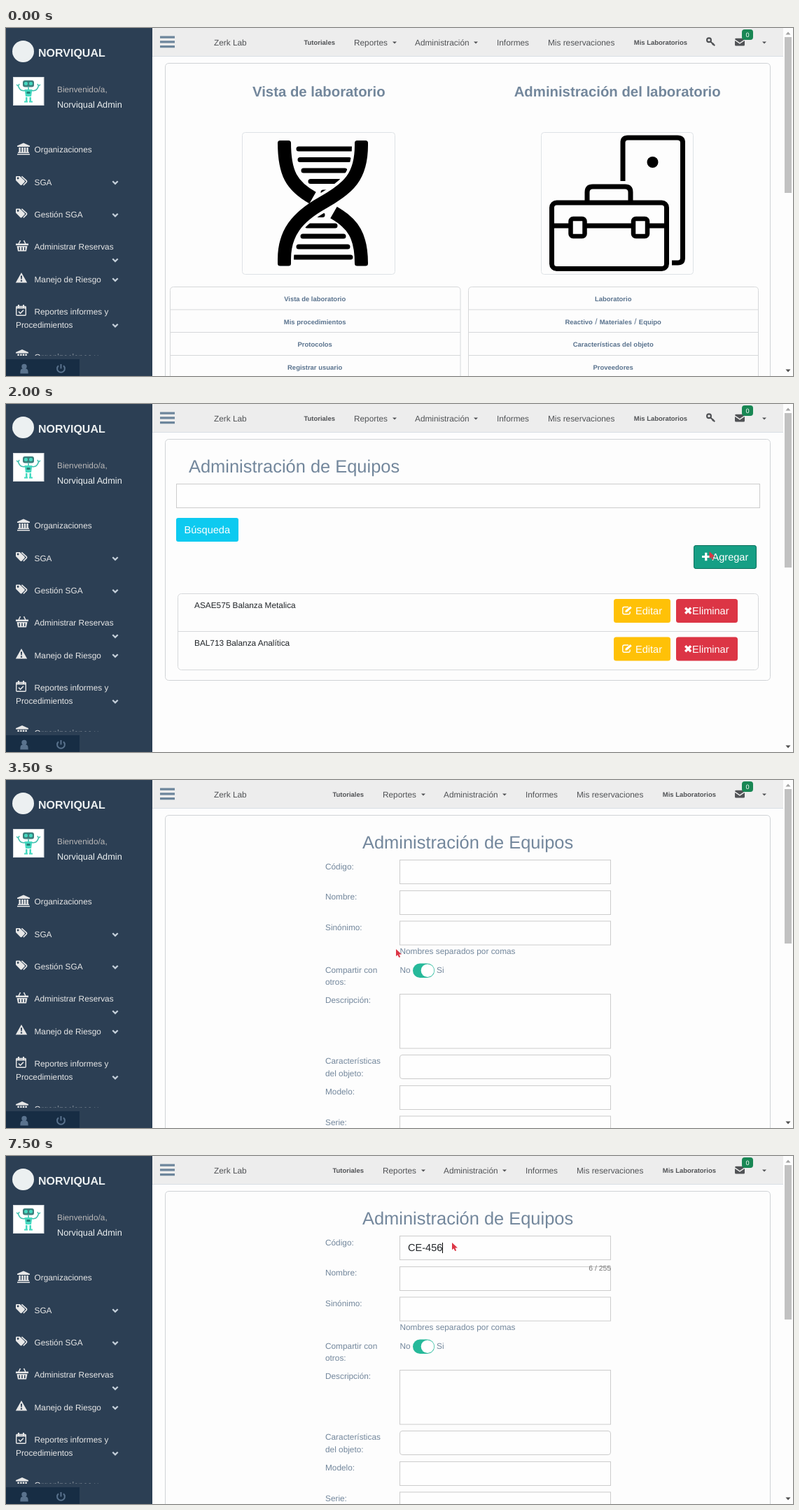
Recreate the animation shown at these times as an HTML page. Size 1124 px wide and 498 px high, loop 8 s.

```html
<!DOCTYPE html>
<html lang="es">
<head>
<meta charset="utf-8">
<title>Administración de Equipos</title>
<style>
html, body { margin: 0; width: 100%; height: 100%; overflow: hidden; background: #fdfdfd; }
svg { display: block; }
text { font: 11.83px "Liberation Sans", Arial, sans-serif; text-rendering: geometricPrecision; white-space: pre; }
.brand { font-size: 16px; font-weight: 700; }
.small, .small text { font-size: 9.46px; font-weight: 700; }
.slash { font-size: 11.83px; font-weight: 400; }
.head { font-size: 20.35px; font-weight: 700; }
.title { font-size: 25.45px; }
.btn text, .typed { font-size: 14.56px; }
.mid, .mid text { text-anchor: middle; }
.slate { fill: #73879c; }
.line { fill: none; stroke: #d6d8da; }
.field { fill: #fefefe; stroke: #ccc; }
.ink { fill: none; stroke: #000; stroke-width: 7; }

.home, .list, .form, .key, .hover, .typed-in, .caret, .nav, .cursor, .thumb {
  animation: 8s step-end infinite;
}
.home { animation-name: home; }
.list { animation-name: list; }
.form { animation-name: form; }
.key { animation-name: key; }
.hover { animation-name: hover; }
.typed-in { animation-name: typed; }
.caret { animation-name: caret; }
.nav { animation-name: nav; }
.cursor { animation-name: cursor; }
.thumb { animation-name: thumb; }
@keyframes home { 0% { opacity: 1 } 12.5%, 100% { opacity: 0 } }
@keyframes list { 0% { opacity: 0 } 12.5% { opacity: 1 } 31.25%, 100% { opacity: 0 } }
@keyframes form { 0% { opacity: 0 } 31.25%, 100% { opacity: 1 } }
@keyframes key { 0% { opacity: 1 } 31.25%, 100% { opacity: 0 } }
@keyframes hover { 0% { opacity: 0 } 25% { opacity: 1 } 31.25%, 100% { opacity: 0 } }
@keyframes typed { 0% { opacity: 0 } 87.5%, 100% { opacity: 1 } }
@keyframes caret { 0% { opacity: 0 } 93.75%, 100% { opacity: 1 } }
@keyframes nav { 0% { transform: none } 31.25%, 100% { transform: translate(41px, 0) } }
@keyframes cursor {
  0% { opacity: 0; transform: translate(911px, 416px) }
  6.25% { opacity: 1; transform: translate(911px, 416px) }
  25% { opacity: 1; transform: translate(1004.5px, 211px) }
  43.75% { opacity: 1; transform: translate(557px, 242px) }
  62.5%, 100% { opacity: 1; transform: translate(637px, 124px) }
}
@keyframes thumb {
  0% { height: 223px } 25% { height: 221px } 31.25% { height: 223px } 43.75%, 100% { height: 221px }
}
</style>
</head>
<body>
<svg width="1124" height="498" viewBox="0 0 1124 498">
<defs>
  <path id="chev" d="M-3.7 -1.8L0 1.9L3.7 -1.8" fill="none" stroke="#c4cfda" stroke-width="2.2"/>
  <path id="drop" d="M0 0h6l-3 3z" fill="#515356"/>
  <path id="bank" d="M9 0L18 4V5.5H0V4zM2.4 6.4h2.4V13H2.4zM6.2 6.4h2.4V13H6.2zM9.8 6.4h2.4V13H9.8zM13.4 6.4h2.4V13h-2.4zM1 13h16v1.6H1zM0 15.4h18V17H0z"/>
  <g id="tags">
    <path fill-rule="evenodd" d="M0 1.2Q0 0 1.2 0H5.8L12.6 6.6Q13.4 7.5 12.6 8.4L8.4 12.7Q7.5 13.4 6.6 12.7L0 6zM1.7 3a1.4 1.4 0 1 0 2.8 0a1.4 1.4 0 1 0 -2.8 0z"/>
    <path d="M8.4 .4L15.3 6.6Q16 7.5 15.3 8.4L10.8 13" fill="none" stroke="#e7e7e7" stroke-width="1.6"/>
  </g>
  <g id="edit" fill="none" stroke="#fff">
    <path d="M9 1.5H3Q.8 1.5 .8 3.7V9.6Q.8 11.8 3 11.8H9Q11.2 11.8 11.2 9.6V8" stroke-width="1.4"/>
    <path d="M5.4 8L12.7 1.6" stroke-width="3.2"/>
    <path d="M4.3 9.2l.5-2.4 1.9 2z" fill="#fff" stroke="none"/>
  </g>
  <g id="row" class="btn">
    <rect x="868" y="279" width="81" height="34" rx="3.5" fill="#ffc107"/>
    <rect x="957" y="279" width="88" height="34" rx="3.5" fill="#dc3545"/>
    <use href="#edit" x="880" y="289"/>
    <path d="M970.2 291.8l8 8M978.2 291.8l-8 8" stroke="#fff" stroke-width="3.4"/>
    <text x="899" y="301" fill="#fff">Editar</text>
    <text x="980" y="301" fill="#fff">Eliminar</text>
  </g>
  <rect id="input" class="field" x="562.5" width="301" height="34"/>
  <rect id="latch" x="-10" y="-13" width="20" height="25" rx="3.5" fill="#fdfdfd" stroke="#000" stroke-width="6.5"/>
  <clipPath id="menu"><rect width="209" height="469"/></clipPath>
</defs>

<rect width="1124" height="498" fill="#fdfdfd"/>

<g class="home">
  <path class="line" d="M227.5 498V56q0-5.500 5.500-5.500H1086q5.500 0 5.500 5.500V498" style="stroke:#d0d3d6"/>
  <g class="mid">
    <text class="head slate" x="446.800" y="98">Vista de laboratorio</text>
    <text class="head slate" x="873.200" y="98">Administración del laboratorio</text>
  </g>
  <rect class="line" x="337.500" y="149.500" width="218" height="203" rx="4" style="stroke:#dee2e6"/>
  <rect class="line" x="764.500" y="149.500" width="217" height="203" rx="4" style="stroke:#dee2e6"/>
  <g class="ink" stroke-linecap="round">
    <path d="M418 173H494M420 188.500H490M425 204H484M435 219.500H478M453 235H470M435 267.500H452M430 283H470M424 298H482M418 313H488M412 328H492"/>
    <g stroke-linecap="butt" stroke-width="19">
      <path d="M507.500 164V168C507.500 212 490 229 452.500 250S397.500 294 397.500 331V337" stroke="#fdfdfd" stroke-width="27"/>
      <path d="M397.500 164C397.500 208 408 226 438 243M468 264C496 280 507.500 298 507.500 337"/>
      <path d="M507.500 164V168C507.500 212 490 229 452.500 250S397.500 294 397.500 331V337"/>
    </g>
    <path d="M391.500 164.500h12M501.500 164.500h12M391.500 337h12M501.500 337h12"/>
  </g>
  <g class="ink">
    <path d="M881 219V164q0-7 7-7H959q7.500 0 7.500 7V329q0 7-7 7H951"/>
    <path d="M830 249V235q0-8 8-8H884q8 0 8 8V249M780 283H943"/>
    <rect x="779.500" y="250" width="164" height="94.500" rx="7"/>
  </g>
  <circle cx="923.500" cy="192" r="8"/>
  <use href="#latch" x="816.500" y="286"/>
  <use href="#latch" x="906" y="286"/>
  <path class="line" d="M234.500 498V375.500q0-5 5-5H644q5 0 5 5V498M234.500 403H649M234.500 435.500H649M234.500 468.500H649"/>
  <path class="line" d="M660.500 498V375.500q0-5 5-5H1069.500q5 0 5 5V498M660.500 403H1074.500M660.500 435.500H1074.500M660.500 468.500H1074.500"/>
  <g class="small mid" fill="#5a738e">
    <text x="441.200" y="390.500">Vista de laboratorio</text>
    <text x="441.200" y="423.500">Mis procedimientos</text>
    <text x="441.200" y="456">Protocolos</text>
    <text x="441.200" y="489">Registrar usuario</text>
    <text x="867.200" y="390.500">Laboratorio</text>
    <text x="867.200" y="423.500">Reactivo<tspan class="slash"> / </tspan>Materiales<tspan class="slash"> / </tspan>Equipo</text>
    <text x="867.200" y="456">Características del objeto</text>
    <text x="867.200" y="489">Proveedores</text>
  </g>
</g>

<g class="list">
  <rect class="line" x="227.500" y="50.500" width="864" height="345" rx="5" style="stroke:#d0d3d6"/>
  <text class="title slate" x="261" y="98">Administración de Equipos</text>
  <rect class="field" x="243.500" y="114.500" width="833" height="34"/>
  <g class="btn" fill="#fff">
    <rect x="243" y="163" width="89" height="34" rx="3" fill="#0dcaf0"/>
    <text x="254.500" y="185">Búsqueda</text>
    <rect x="982.500" y="202.500" width="89" height="33" rx="3" fill="#26b99a" stroke="#169f85"/>
    <rect class="hover" x="982.500" y="202.500" width="89" height="33" rx="3" fill="#169f85" stroke="#0e6f5d"/>
    <path d="M994 218.500h11.500M999.750 212.800v11.500" stroke="#fff" stroke-width="3.200"/>
    <text x="1008.500" y="224">Agregar</text>
  </g>
  <path class="line" d="M245.500 325.500H1074.500"/>
  <rect class="line" x="245.500" y="271.500" width="829" height="109" rx="5"/>
  <text x="269" y="291.500" fill="#212529">ASAE575 Balanza Metalica</text>
  <text x="269" y="346" fill="#212529">BAL713 Balanza Analítica</text>
  <use href="#row"/>
  <use href="#row" y="54.500"/>
</g>

<g class="form">
  <path class="line" d="M227.500 498V56q0-5.500 5.500-5.500H1086q5.500 0 5.500 5.500V498" style="stroke:#d0d3d6"/>
  <text class="title slate" x="509" y="98">Administración de Equipos</text>
  <g class="slate">
    <text x="456" y="127.500">Código:</text>
    <text x="456" y="171">Nombre:</text>
    <text x="456" y="214.500">Sinónimo:</text>
    <text x="562.500" y="249">Nombres separados por comas</text>
    <text x="456" y="275.500">Compartir con</text>
    <text x="456" y="292.500">otros:</text>
    <text x="562.500" y="276">No</text>
    <text x="615" y="276">Si</text>
    <text x="456" y="319">Descripción:</text>
    <text x="456" y="406">Características</text>
    <text x="456" y="423.500">del objeto:</text>
    <text x="456" y="450">Modelo:</text>
    <text x="456" y="493.500">Serie:</text>
  </g>
  <use href="#input" y="114.500"/>
  <use href="#input" y="158.500"/>
  <use href="#input" y="202"/>
  <rect class="field" x="562.500" y="306.500" width="301" height="77.500"/>
  <rect class="field" x="562.500" y="393.500" width="301" height="34" rx="3.500"/>
  <use href="#input" y="437.500"/>
  <use href="#input" y="481"/>
  <rect x="581" y="262.500" width="31" height="20.500" rx="10.250" fill="#26b99a"/>
  <circle cx="602" cy="272.700" r="9.300" fill="#fff"/>
  <g class="typed-in">
    <text class="typed" x="574" y="136" fill="#212529">CE-456</text>
    <text x="864" y="163.500" text-anchor="end" fill="#777" style="font-size:10.400px">6 / 255</text>
  </g>
  <rect class="caret" x="623" y="124" width="1" height="15"/>
</g>

<rect x="209" width="901" height="40" fill="#ededed"/>
<rect x="209" y="40" width="901" height="1" fill="#d9dee4"/>
<path d="M220 13.200h21M220 19.900h21M220 26.600h21" stroke="#6d869c" stroke-width="3.300"/>
<g fill="#515356">
  <text x="297" y="24.500">Zerk Lab</text>
  <g class="nav">
    <text class="small" x="425.500" y="24">Tutoriales</text>
    <text x="497" y="24.500">Reportes</text>
    <use href="#drop" x="552" y="19.500"/>
    <text x="584" y="24.500">Administración</text>
    <use href="#drop" x="668" y="19.500"/>
    <text x="701" y="24.500">Informes</text>
    <text x="774" y="24.500">Mis reservaciones</text>
    <text class="small" x="896.800" y="24">Mis Laboratorios</text>
  </g>
  <g class="key" fill="none" stroke="#515356">
    <circle cx="1004" cy="17.300" r="2.900" stroke-width="2.200"/>
    <path d="M1006 19.300l6.300 6M1008.800 24l2-2" stroke-width="2"/>
  </g>
  <path d="M1041 16.200q0-1.500 1.500-1.500h11q1.500 0 1.500 1.500l-7 4.800zM1041 18l7 4.800 7-4.800v6q0 1.500-1.500 1.500h-11q-1.500 0-1.500-1.500z"/>
  <use href="#drop" x="1080" y="19.500"/>
</g>
<rect x="1051" y="2" width="16" height="15" rx="4" fill="#198754"/>
<text class="mid" x="1059" y="12.700" fill="#fff" style="font-size:9.200px">0</text>

<path d="M1113.500 9.500h7l-3.500-4z" fill="#a3a3a3"/>
<path d="M1113.500 488.500h7l-3.500 4z" fill="#505050"/>
<rect class="thumb" x="1112" y="13" width="10" height="223" fill="#c1c1c1"/>

<rect width="209" height="498" fill="#2c3f54"/>
<circle cx="24.500" cy="33.500" r="15.500" fill="#ecf0f1"/>
<text class="brand" x="46" y="41" fill="#ecf0f1">NORVIQUAL</text>
<rect x="10.500" y="70.500" width="43.500" height="40" fill="#fff" stroke="#d5d9dd"/>
<g fill="#45d9c0">
  <rect x="24" y="75" width="16" height="9.500" rx="3" fill="#3b7f7c"/>
  <path d="M26.500 88h11l-1.500 10h-8zM28 99h2.500v6H28zM33.500 99H36v6h-2.500zM26 104.500h5v2h-5zM33 104.500h5v2h-5z"/>
  <path d="M27 89.500Q20 91 17.500 83M37 89.500Q44 91 46.500 83M15 81l2.500 2 1.500-3M45 80l1.500 3 2.500-2M32 84.500V88" fill="none" stroke="#3fbfae" stroke-width="1.600"/>
  <circle cx="28.500" cy="79.500" r="2.500"/>
  <circle cx="35.500" cy="79.500" r="2.500"/>
  <path d="M29.500 91h5v3h-5z" fill="#267f78"/>
</g>
<text x="73" y="92" fill="#bab8b8">Bienvenido/a,</text>
<text x="73" y="113.500" fill="#ecf0f1" style="font-size:12.740px">Norviqual Admin</text>

<g fill="#e7e7e7" clip-path="url(#menu)">
  <use href="#bank" x="16" y="164.500"/>
  <text x="40.500" y="178">Organizaciones</text>
  <use href="#tags" x="14" y="212"/>
  <text x="40.500" y="224.500">SGA</text>
  <use href="#tags" x="14" y="258.500"/>
  <text x="40.500" y="271">Gestión SGA</text>
  <path d="M18 309l2.500-5M28 309l-2.500-5" fill="none" stroke="#e7e7e7" stroke-width="1.600"/>
  <path fill-rule="evenodd" d="M14 308.500h18v2.500H14zM15.500 312h15l-1.500 7.500H17zM18.500 313.500v4.500h1.500v-4.500zM22.200 313.500v4.500h1.500v-4.500zM26 313.500v4.500h1.500v-4.500z"/>
  <text x="40.500" y="317.300">Administrar Reservas</text>
  <path fill-rule="evenodd" d="M22 350l8.200 14.500H13.800zM20.900 354.500l.4 5h1.400l.4-5zM20.900 360.700v2h2.200v-2z"/>
  <text x="40.500" y="363.800">Manejo de Riesgo</text>
  <g fill="none" stroke="#e7e7e7">
    <rect x="14.700" y="398.500" width="13.600" height="12.800" rx="1" stroke-width="1.400"/>
    <path d="M14.500 400.500h14M18 396v4M25 396v4" stroke-width="2"/>
    <path d="M18 405.800l2.500 2.500 4.500-4.500" stroke-width="1.600"/>
  </g>
  <text x="40.500" y="410.200">Reportes informes y</text>
  <text x="14" y="428.500">Procedimientos</text>
  <use href="#bank" x="14" y="460"/>
  <text x="40.500" y="474.500">Organizaciones y</text>
  <use href="#chev" x="156" y="221"/>
  <use href="#chev" x="156" y="267.500"/>
  <use href="#chev" x="156" y="332"/>
  <use href="#chev" x="156" y="360"/>
  <use href="#chev" x="156" y="425.500"/>
</g>
<rect y="474" width="105" height="24" fill="#172d44"/>
<g fill="#5a738e">
  <circle cx="26" cy="484.500" r="3.700"/>
  <path d="M20.300 494.500Q20 487.500 23.500 487.500h5Q32 487.500 31.700 494.500z"/>
  <path d="M75 483.300a5.400 5.400 0 1 0 7 0M78.500 481v6.500" fill="none" stroke="#5a738e" stroke-width="2"/>
</g>

<path class="cursor" d="M0 0V10.300L2.300 8.300L4.300 12L6.200 11.200L4.400 7.400H8z" fill="#dc3545"/>
</svg>
</body>
</html>
```
